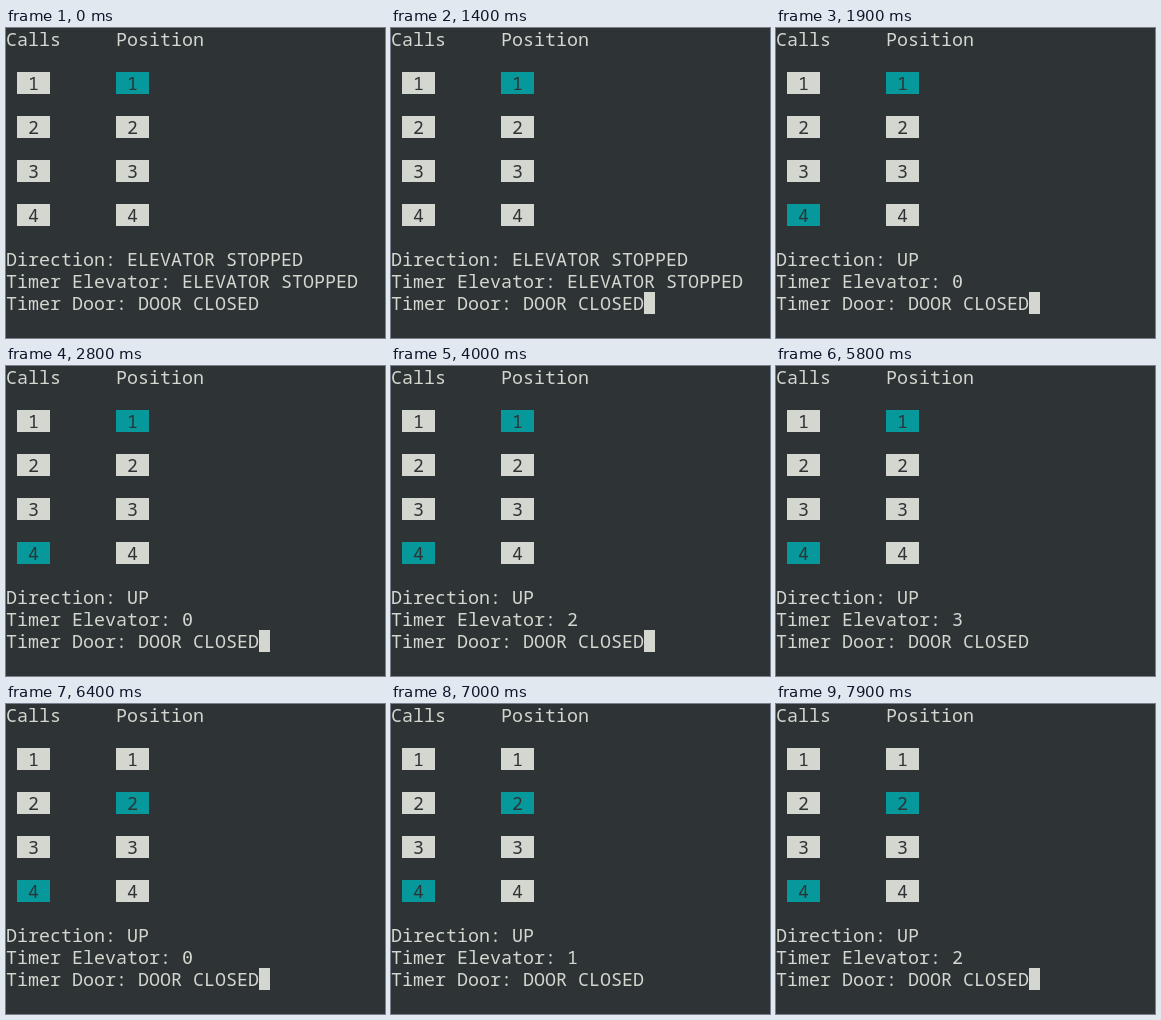
These frames come from a looping animation (379 px wide and 310 px high, 8 s). An HTML page:

```html
<!DOCTYPE html>
<html lang="en">
<head>
<meta charset="utf-8">
<title>Elevator panel</title>
<style>
  :root { --bg: #2e3436; --fg: #d3d7cf; --on: #06989a; }
  html, body { margin: 0; width: 100%; height: 100%; overflow: hidden; background: var(--bg); }
  svg { display: block; width: 379px; height: 310px; }
  /* 18.333px gives an 11px advance, so text sits on an 11 x 22 grid */
  text { font: 18.333px "Noto Sans Mono", "DejaVu Sans Mono", monospace; fill: var(--fg); white-space: pre; }
  .zero { font-family: "DejaVu Sans Mono", monospace; }
  .cell rect, #cursor { fill: var(--fg); }
  .cell text { fill: var(--bg); }

  #cursor, .idle, .moving, .count, #call4 rect, #floor1 rect, #floor2 rect {
    animation: 8s step-end infinite;
  }
  #cursor { animation-name: blink; }
  .idle { animation-name: idle; }
  .moving { animation-name: moving; }
  #call4 rect { animation-name: called; }
  #floor1 rect { animation-name: leave; }
  #floor2 rect { animation-name: arrive; }
  .n0 { animation-name: n0; }
  .n1 { animation-name: n1; }
  .n2 { animation-name: n2; }
  .n3 { animation-name: n3; }

  @keyframes blink {
    0%, 10%, 27.5%, 42.5%, 61.25%, 72.5%, 87.5% { opacity: 0; }
    2.5%, 17.5%, 35%, 50%, 65%, 80%, 98.75% { opacity: 1; }
  }
  @keyframes idle { 0% { opacity: 1; } 23.75%, 100% { opacity: 0; } }
  @keyframes moving { 0% { opacity: 0; } 23.75%, 100% { opacity: 1; } }
  @keyframes called { 0% { fill: var(--fg); } 23.75%, 100% { fill: var(--on); } }
  @keyframes leave { 0% { fill: var(--on); } 73.75%, 100% { fill: var(--fg); } }
  @keyframes arrive { 0% { fill: var(--fg); } 73.75%, 100% { fill: var(--on); } }

  /* the timer advances once a second and restarts at each floor */
  @keyframes n0 { 0%, 36.25%, 86.25%, 100% { opacity: 0; } 23.75%, 73.75% { opacity: 1; } }
  @keyframes n1 { 0%, 48.75%, 98.75%, 100% { opacity: 0; } 36.25%, 86.25% { opacity: 1; } }
  @keyframes n2 { 0%, 61.25% { opacity: 0; } 48.75%, 98.75%, 100% { opacity: 1; } }
  @keyframes n3 { 0%, 73.75%, 100% { opacity: 0; } 61.25% { opacity: 1; } }
</style>
</head>
<body>
<svg viewBox="0 0 379 310">
  <text x="0" y="18">Calls</text>
  <text x="110" y="18">Position</text>

  <g class="cell" transform="translate(11 44)"><rect width="33" height="22"/><text x="11" y="18">1</text></g>
  <g class="cell" transform="translate(11 88)"><rect width="33" height="22"/><text x="11" y="18">2</text></g>
  <g class="cell" transform="translate(11 132)"><rect width="33" height="22"/><text x="11" y="18">3</text></g>
  <g class="cell" id="call4" transform="translate(11 176)"><rect width="33" height="22"/><text x="11" y="18">4</text></g>

  <g class="cell" id="floor1" transform="translate(110 44)"><rect width="33" height="22"/><text x="11" y="18">1</text></g>
  <g class="cell" id="floor2" transform="translate(110 88)"><rect width="33" height="22"/><text x="11" y="18">2</text></g>
  <g class="cell" transform="translate(110 132)"><rect width="33" height="22"/><text x="11" y="18">3</text></g>
  <g class="cell" transform="translate(110 176)"><rect width="33" height="22"/><text x="11" y="18">4</text></g>

  <text x="0" y="238">Direction:</text>
  <text class="idle" x="121" y="238">ELEVATOR STOPPED</text>
  <text class="moving" x="121" y="238">UP</text>

  <text x="0" y="260">Timer Elevator:</text>
  <text class="idle" x="176" y="260">ELEVATOR STOPPED</text>
  <text class="count n0 zero" x="176" y="260">0</text>
  <text class="count n1" x="176" y="260">1</text>
  <text class="count n2" x="176" y="260">2</text>
  <text class="count n3" x="176" y="260">3</text>

  <text x="0" y="282">Timer Door: DOOR CLOSED</text>
  <rect id="cursor" x="253" y="264" width="11" height="22"/>
</svg>
</body>
</html>
```
